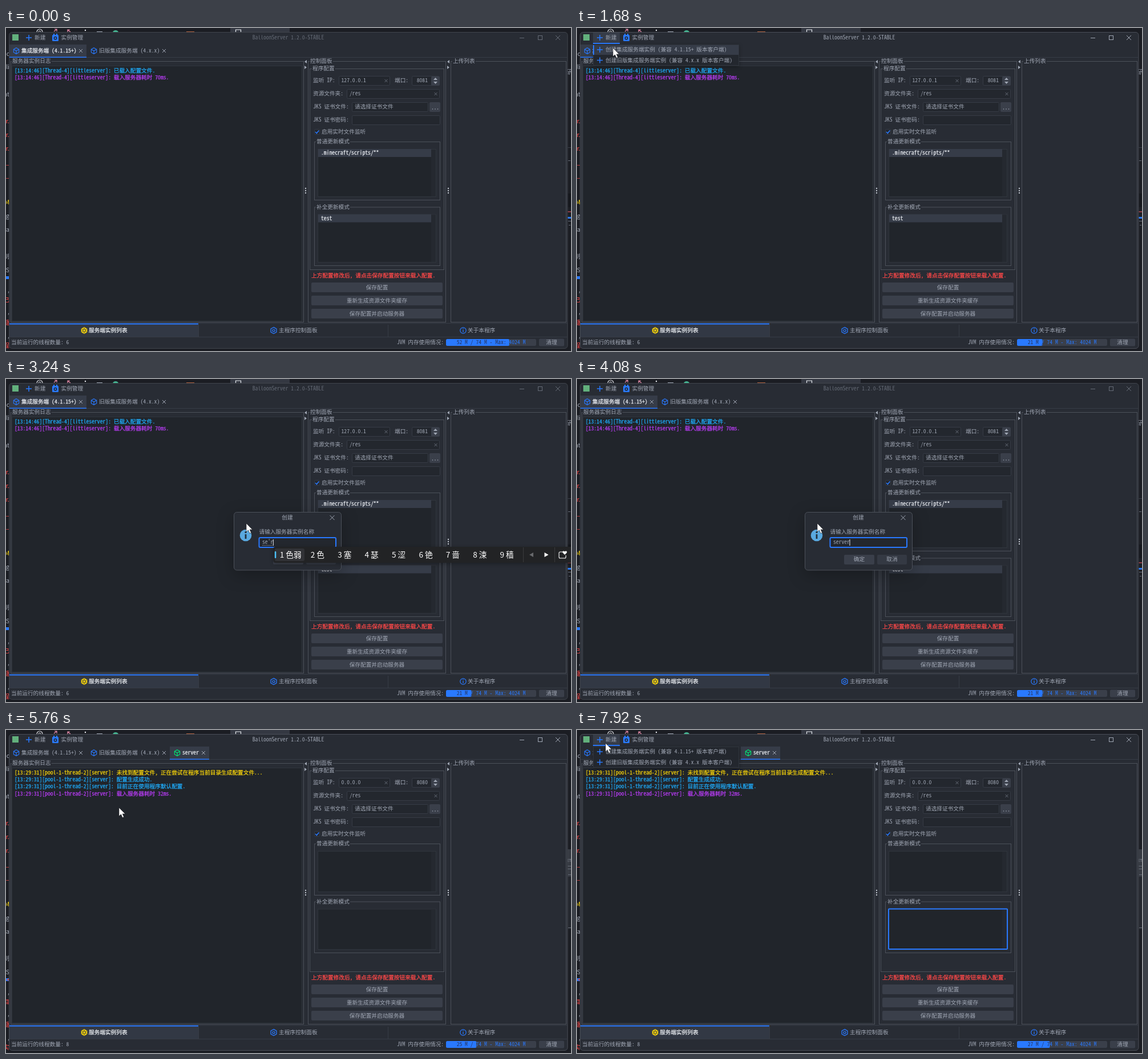
Recreate the animation shown at these times as an HTML page. Size 990 px wide and 566 px high, loop 8 s.

```html
<!DOCTYPE html>
<html lang="zh-CN">
<head>
<meta charset="utf-8">
<title>BalloonServer</title>
<style>
  html, body { margin: 0; width: 100%; height: 100%; overflow: hidden; background: #1b1d23; }
  svg { display: block; width: 990px; height: 566px; }
  text { font: 9.66px "Noto Sans Mono CJK SC", "Noto Sans CJK SC", "Noto Sans CJK", monospace; white-space: pre; }
  .strong { stroke-width: .25px; }
  .ime text { font: 13.6px "Noto Sans CJK SC", "Noto Sans CJK", sans-serif; }
  .behind text { font: 10.5px "Noto Sans CJK SC", "Noto Sans CJK", sans-serif; }
  .dialog { filter: drop-shadow(0 8px 14px rgba(0, 0, 0, .25)); }
  .popup, .ime { filter: drop-shadow(0 2px 3px rgba(0, 0, 0, .3)); }
</style>
</head>
<body>
<svg id="stage" viewBox="0 0 990 566" xmlns="http://www.w3.org/2000/svg"></svg>
<script>
const LOOP = 8000, STEP = 120, HALF = 4.83;
const BG = '#282c34', DEEP = '#21252b', FG = '#a0a7b4', DIM = '#656b76', WHITE = '#e8ebf0',
      LINE = '#4c515a', EDGE = '#373c46', BTN = '#3a3f4a', SEL = '#363c48', BLUE = '#2979ff',
      CYAN = '#1fabfa', PURPLE = '#b83cf5', YELLOW = '#f5d20a', RED = '#ff4848', GREEN = '#00e676';

// time, x, y of the pointer tip
const POINTER = [
  [120, 960, 330], [480, 400, 120], [840, 50, 18], [1080, 50, 18], [1440, 62, 34], [1680, 63, 35],
  [1800, 63, 35], [2400, 413, 247], [2520, 413, 247], [2760, 421, 253], [4080, 421, 253],
  [4680, 486, 311], [4920, 486, 311], [5760, 198, 136], [6000, 215, 168], [6240, 215, 168],
  [6720, 620, 250], [6840, 605, 319], [7080, 600, 330], [7200, 600, 330], [7800, 50, 18], [7920, 50, 23]
];
// time, used memory in M
const MEMORY = [[0, 52], [600, 21], [4440, 23], [5280, 25], [6960, 27]];
// time, composed text, candidates
const TYPING = [
  [3000, 's', '是 上 说 三 时 岁 四 算 所'],
  [3120, 'se', '色 塞 瑟 涩 铯 啬 涑 穑 歮'],
  [3240, "se'r", '色弱 色 塞 瑟 涩 铯 啬 涑 穑'],
  [3480, "se'r'v", '色弱 色 塞 瑟 涩 铯 啬 涑 穑'],
  [3600, "se'r'v'e", '色弱 色 塞 瑟 涩 铯 啬 涑 穑'],
  [3720, "se'r'v'er", '色弱 色 塞 瑟 涩 铯 啬 涑 穑']
];

const last = (rows, t) => rows.filter(r => r[0] <= t).pop();
const wide = s => [...s].reduce((w, c) => w + (c > '\u2e80' ? 2 : 1) * HALF, 0);
const text = (x, y, s, fill = FG, more = '') => `<text x="${x}" y="${y + 3}" fill="${fill}" ${more}>${s}</text>`;
const strong = (x, y, s, fill) => text(x, y, s, fill, `class="strong" stroke="${fill}"`);
const mid = (x, y, s, fill, more = '') => text(x, y, s, fill, 'text-anchor="middle" ' + more);
const box = (x1, y1, x2, y2, fill, r = 0, more = '') =>
  `<rect x="${x1}" y="${y1}" width="${x2 - x1}" height="${y2 - y1}" rx="${r}" fill="${fill}" ${more}/>`;
const frame = (x1, y1, x2, y2, stroke, fill = 'none', r = 0, w = 1) =>
  box(x1, y1, x2, y2, fill, r, `stroke="${stroke}" stroke-width="${w}"`);
const path = (d, stroke, w = 1, fill = 'none', more = '') =>
  `<path d="${d}" stroke="${stroke}" stroke-width="${w}" fill="${fill}" ${more}/>`;
const fillPath = (d, fill) => path(d, 'none', 0, fill);
const cross = (x, y, r, c) => path(`M${x - r} ${y - r}L${x + r} ${y + r}M${x + r} ${y - r}L${x - r} ${y + r}`, c);
const plus = (x, y) => path(`M${x - 5} ${y}h10M${x} ${y - 5}v10`, BLUE, 1.5);
const dot = (x, y, r, c) => `<circle cx="${x}" cy="${y}" r="${r}" fill="${c}"/>`;
const ring = (x, y, r, c, w) => `<circle cx="${x}" cy="${y}" r="${r}" fill="none" stroke="${c}" stroke-width="${w}"/>`;
const hexagon = (x, y, r) => `M${x} ${y - r}l${r * .88} ${r / 2}v${r}l${-r * .88} ${r / 2}l${-r * .88} ${-r / 2}v${-r}z`;
const cube = (x, y, c) => path(hexagon(x, y, 5.3) + `M${x - 4.6} ${y - 2.6}l4.6 2.6l4.6 -2.6M${x} ${y}v5.3`, c, 1.1);
const group = (x1, y1, x2, y2, title, tx) =>
  frame(x1 + .5, y1 + .5, x2 - .5, y2 - .5, LINE) + box(tx - 1, y1 - 4, tx + wide(title) + 1, y1 + 5, BG) + text(tx, y1, title);
const field = (x1, y1, x2, y2) => frame(x1 + .5, y1 + .5, x2 - .5, y2 - .5, EDGE, '#23272e', 2);
const button = (x1, y1, x2, y2, s) => box(x1, y1, x2, y2, BTN, 2) + mid((x1 + x2) / 2, (y1 + y2) / 2, s);

function pointerAt(t) {
  const i = POINTER.findIndex(p => p[0] > t);
  if (i < 0) return POINTER[POINTER.length - 1].slice(1);
  if (!i) return [-50, -50];
  const [t0, x0, y0] = POINTER[i - 1], [t1, x1, y1] = POINTER[i];
  const u = (t - t0) / (t1 - t0), k = u * u * (3 - 2 * u);
  return [x0 + (x1 - x0) * k, y0 + (y1 - y0) * k];
}

// slivers of the editor that show around the window
function behind(t) {
  const late = t >= 5160;
  const left = [[46, 'fic', FG], [69, 'eli', FG], [117, 'at', FG], [164, 'r.', RED], [188, 'r.', RED], [212, 'r.', RED],
    [236, 'r_', RED], [259, 'r_', RED], [306, 'M', YELLOW], [330, 'g', FG], [354, 'ra', FG], [401, '制', FG], [425, 'S', FG],
    [460, ',', FG], [477, late ? '目' : '已', RED], [498, ',', FG], [517, '髓', RED], [540, ',', FG], [557, late ? '实' : '程', RED]];
  let s = box(0, 0, 990, 566, '#1b1d23') + box(393, 0, 497, 8, '#343842');
  s += left.map(([y, c, f]) => text(6, y, c, f, 'text-anchor="end"')).join('');
  s += box(0, 435, 6, 440, BLUE) + (late ? box(2, 436, 6, 439, '#b3475d') : '');
  s += ring(59, 7, 5, '#d8dae0', 1.2) + ring(59, 7, 2, '#d8dae0', 1);
  s += path('M84 6l5 -4M85 2h4v4M113 7l-5 -4M108 7v-4h4', '#e58aa8', 1.2);
  s += dot(139, 4, 1.2, WHITE) + box(159, 6, 169, 8, FG) + fillPath('M187 8a5 4 0 0 1 10 0z', '#45b592');
  s += box(316, 6, 330, 8, '#b0603c') + path('M402.500 8v-5h9v5', WHITE, 1.2);
  if (t < 4920 || (t >= 6360 && t < 7440)) s += text(982, 78, '研', FG);
  if (late) {
    s += box(983, 209, 990, 257, '#363a42') + box(983, 257, 990, 349, '#24272e');
    s += `<text x="983" y="231" fill="${FG}" style="font-size:6px">ET</text>`;
    s += box(984, 238, 990, 239, DIM) + box(984, 243, 990, 244, DIM) + box(985, 253, 990, 254, DIM) + box(985, 346, 990, 347, DIM);
  } else {
    s += box(983, 209, 990, 210, EDGE) + box(983, 290, 990, 314, '#15171c') + box(985, 232, 989, 233, DIM);
    s += box(984, 321, 990, 323, '#8d3b45') + box(984, 331, 990, 334, BLUE) + box(985, 338, 990, 339, DIM) + box(986, 345, 989, 346, DIM);
  }
  return `<g class="behind">${s}</g>`;
}

function header(t, focus, hover) {
  const c = focus ? FG : DIM, made = t >= 5160;
  const tab = (x1, x2) => box(x1, 29, x2, 51, SEL) + box(x1, 50.5, x2, 52, BLUE);
  let s = box(11, 11, 22, 22, '#62b07c');
  if (hover) s += box(28, 8, 75, 28, SEL) + box(28, 26, 75, 28, BLUE);
  s += plus(40, 17) + text(50, 17, '新建');
  s += box(81, 12, 92, 23, BLUE, 1.5) + box(83, 10, 85, 13, BLUE) + box(88, 10, 90, 13, BLUE) + ring(86.5, 17.8, 2.2, DEEP, 1.5);
  s += text(96.5, 17, '实例管理') + mid(494.5, 17, 'BalloonServer 1.2.0-STABLE', c);
  s += path('M900 17.500h8', c) + frame(932.5, 13.5, 939.5, 20.5, c) + cross(967, 17, 4, c);
  s += box(6, 51, 984, 52, EDGE) + (made ? tab(287, 356) : tab(6, 141));
  s += cube(18, 40, BLUE) + (made ? text : strong)(27, 40, '集成服务端 (4.1.15+)', made ? FG : WHITE) + cross(131, 40, 3, FG);
  s += cube(154, 40, BLUE) + text(163, 40, '旧版集成服务端 (4.x.x)') + cross(277, 40, 3, FG);
  if (made) s += cube(300, 40, GREEN) + strong(309, 40, 'server', WHITE) + cross(346, 40, 3, FG);
  return s;
}

function logs(t, made) {
  const rows = made
    ? [[YELLOW, '未找到配置文件, 正在尝试在程序当前目录生成配置文件...'], [CYAN, '配置生成成功.'],
       [CYAN, '目前正在使用程序默认配置.'], [PURPLE, '载入服务器耗时 32ms.']]
    : [[CYAN, '已载入配置文件.'], [PURPLE, '载入服务器耗时 70ms.']];
  const head = made ? '[13:29:31][pool-1-thread-2][server]: ' : '[13:14:46][Thread-4][littleserver]: ';
  let s = group(8, 58, 522, 516, '服务器实例日志', 11) + frame(10.5, 66.5, 518.5, 513.5, '#30353d', DEEP);
  if (t >= 5880 && t < 6720) s += frame(10, 66, 519, 513, BLUE, 'none', 1, 2);
  return s + rows.map(([c, m], i) => strong(15, 75 + i * 12.2, head + m, c)).join('');
}

function list(y1, y2, title, item, focus) {
  let s = group(540, y1, 761, y2, title, 544);
  s += frame(546.5, y1 + 13.5, 753.5, y2 - 6.5, '#30353d', DEEP) + box(745, y1 + 14, 753, y2 - 7, '#252930');
  if (item) s += box(547, y1 + 13, 745, y1 + 27, SEL) + strong(552, y1 + 20, item, WHITE);
  if (focus) s += frame(546, y1 + 13, 754, y2 - 7, BLUE, 'none', 1, 2);
  return s;
}

function panel(t, made) {
  let s = group(529, 58, 771, 516, '控制面板', 533) + group(532, 71, 768, 424, '程序配置', 537);
  s += text(538, 92, '监听 IP:') + field(583, 84, 673, 101) + text(587.5, 92, made ? '0.0.0.0' : '127.0.0.1') + cross(666, 92.5, 2.5, DIM);
  s += text(681, 92, '端口:') + field(711, 84, 760, 101) + text(739, 92, made ? '8080' : '8081', FG, 'text-anchor="end"');
  s += box(745, 85, 760, 101, BTN, 2) + fillPath('M749 91l3.500 -4l3.500 4zM749 94l3.500 4l3.500 -4z', FG);
  s += text(538, 115, '资源文件夹:') + field(597, 107, 760, 124) + text(602, 115, '/res') + cross(753, 115.5, 2.5, DIM);
  s += text(538, 138, 'JKS 证书文件:') + field(606, 130, 740, 147) + text(611, 138, '请选择证书文件') + box(742, 130, 761, 147, BTN, 2);
  s += [747.5, 752, 756.5].map(x => dot(x, 142, .8, FG)).join('');
  s += text(538, 161, 'JKS 证书密码:') + field(606, 153, 761, 170);
  s += frame(540.5, 177.5, 549.5, 186.5, EDGE, '#23272e', 2) + path('M542 182l2.300 2.500l4 -5', BLUE, 1.5) + text(553, 182, '启用实时文件监听');
  s += made
    ? list(199, 290, '普通更新模式', '', t >= 6720 && t < 6960) + list(300.5, 391, '补全更新模式', '', t >= 6960)
    : list(199, 302, '普通更新模式', '.minecraft/scripts/**') + list(313.5, 417, '补全更新模式', 'test');
  s += strong(535, 434, '上方配置修改后, 请点击保存配置按钮来载入配置.', RED);
  ['保存配置', '重新生成资源文件夹缓存', '保存配置并启动服务器'].forEach((b, i) => s += button(535, 446 + i * 23, 765, 463 + i * 23, b));
  for (const x of [525, 775]) {
    s += fillPath(`M${x + 2} 56v6l-4 -3zM${x - 2} 66v6l4 -3z`, FG);
    s += [281, 285, 289].map(y => dot(x, y, 1.2, '#c0c5ce')).join('');
  }
  return s + group(779, 58, 982, 516, '上传列表', 783);
}

function footer(t) {
  const used = last(MEMORY, t)[1], end = 771 + 158 * used / 74, label = `${used} M / 74 M - Max: 4024 M`;
  let s = box(6, 517, 984, 518, EDGE) + box(6, 518, 337, 541, '#323844') + box(6, 517.5, 337, 519.5, BLUE);
  s += box(337, 520, 338, 541, EDGE) + box(669, 520, 670, 541, EDGE) + box(6, 541, 984, 542, EDGE);
  s += fillPath(hexagon(137, 530, 6), YELLOW) + ring(137, 530, 2.4, '#323844', 1) + path('M137 525v2.500M137 532.500v2.500M132.700 527.500l2 1.200M139.300 531.300l2 1.200M141.300 527.500l-2 1.200M134.700 531.300l-2 1.200', '#323844', .8);
  s += strong(145, 529.5, '服务端实例列表', WHITE) + path(hexagon(469, 530, 5.6), BLUE, 1.3) + ring(469, 530, 2, BLUE, 1.2);
  s += text(478, 529.5, '主程序控制面板') + ring(801, 530, 5.2, BLUE, 1.2) + path('M801 529v4M801 526.500v1.300', BLUE, 1.3) + text(809, 529.5, '关于本程序');
  s += text(9, 551, '当前运行的线程数量: ' + (t >= 5160 ? 8 : 6)) + text(685, 551, 'JVM 内存使用情况:');
  s += box(771, 545, 929, 557, BTN, 2.5) + mid(850, 551, label, BLUE);
  s += `<clipPath id="used">${box(771, 545, end, 557, '#000', 2.5)}</clipPath><g clip-path="url(#used)">`;
  s += box(771, 545, end, 557, BLUE) + mid(850, 551, label, '#27345a') + '</g>';
  return s + button(934, 544.5, 978, 557.5, '清理');
}

function menu(hover) {
  let s = frame(28.5, 29.5, 283.5, 65.5, '#30353d', '#23272e');
  if (hover) s += box(29, 30, 283, 47, SEL) + box(28, 30, 30, 47, BLUE);
  s += plus(40, 38) + text(50, 38, '创建集成服务端实例 (兼容 4.1.15+ 版本客户端)');
  s += plus(40, 56.5) + text(50, 56.5, '创建旧版集成服务端实例 (兼容 4.x.x 版本客户端)');
  return `<g class="popup">${s}</g>`;
}

function dialog(t, typed) {
  const pressed = t >= 4680, value = t >= 4080 ? 'server' : typed ? typed[1] : '', caret = 448.5 + wide(value);
  let s = `<g class="dialog">${frame(399.5, 233.5, 587.5, 335, LINE, BG, 5)}</g>`;
  s += mid(493, 243, '创建') + cross(571.5, 243, 4, FG) + dot(420, 274, 10.3, '#5aa9e0');
  s += box(418.6, 272, 421.4, 280, '#22303d') + dot(420, 268.6, 1.7, '#22303d') + text(443.5, 268, '请输入服务器实例名称');
  s += pressed ? field(443, 278, 578, 295) : frame(443.5, 278, 578, 295, BLUE, '#23272e', 2, 2);
  s += text(449, 286, value);
  if (!pressed && t >= 2520) s += box(caret, 281, caret + 1, 292, WHITE);
  if (typed && t < 4080) s += path(`M449 291.500H${caret}`, FG, 1, 'none', 'stroke-dasharray="1 1"');
  s += box(468, 308, 521, 325, BTN, 2) + mid(494.5, 316, '确定', pressed ? WHITE : FG);
  if (pressed) s += frame(468, 308, 521, 325, BLUE, 'none', 3, 2);
  return s + box(526, 308, 578, 325, '#343943', 2) + mid(552, 316, '取消');
}

function ime([, typed, words]) {
  const x0 = 449 + wide(typed);
  let x = x0 + 11.500, s = box(x0, 294, 1010, 322, '#222325', 4);
  words.split(' ').forEach((w, i) => {
    const width = 10 + 13.6 * w.length, y = 313;
    if (!i) s += box(x - 9, 297, x + width + 6, 319, '#313236', 3) + box(x - 9, 302, x - 6.500, 314, '#4cc2ff', 1);
    s += `<text x="${x}" y="${y}" fill="#fff">${i + 1}</text><text x="${x + 10.500}" y="${y}" fill="#fff">${w}</text>`;
    x += Math.max(47.4, width + 16.8);
  });
  s += box(x - 7, 295, x - 6, 321, '#3a3b3e') + box(x + 48, 295, x + 49, 321, '#3a3b3e');
  s += fillPath(`M${x + 11} 304v8l-7 -4z`, '#68696c') + fillPath(`M${x + 30.5} 304v8l7 -4z`, '#fff');
  s += path(`M${x + 63} 303h-5q-2 0 -2 2v7q0 2 2 2h8q2 0 2 -2v-3`, '#fff', 1.1);
  s += fillPath(`M${x + 66} 308l-3.500 -3.500q-1 -3 1.500 -3q1.300 0 2 1q.7 -1 2 -1q2.500 0 1.500 3z`, '#fff');
  return `<g class="ime">${s}</g>`;
}

function scene(t) {
  const [px, py] = pointerAt(t), made = t >= 5160, typed = last(TYPING, t);
  const open = (t >= 1080 && t <= 1800) || t >= 7800;
  const hover = open || (px > 28 && px < 75 && py > 7 && py < 29);
  const focus = (t >= 1080 && t < 1920) || t >= 4800;
  let s = behind(t) + frame(5.5, 7.5, 984, 561.5, focus ? '#4a4e57' : '#40444c', BG, 5);
  s += header(t, focus, hover) + logs(t, made) + panel(t, made) + footer(t);
  if (open) s += menu(py > 29);
  if (t >= 1920 && t < 5040) s += dialog(t, typed);
  if (typed && t < 4080) s += ime(typed);
  return s + path('M0 0V15L3.500 11.800L6 17.500L8.600 16.400L6.200 10.900H10.800Z', '#15171b', .6, '#fff', `transform="translate(${px.toFixed(1)} ${py.toFixed(1)})"`);
}

const stage = document.getElementById('stage'), start = performance.now();
let shown = -1;
function tick() {
  const t = (performance.now() - start) % LOOP, step = Math.floor(t / STEP) * STEP;
  if (step !== shown) stage.innerHTML = scene(shown = step);
  requestAnimationFrame(tick);
}
tick();
</script>
</body>
</html>
```
